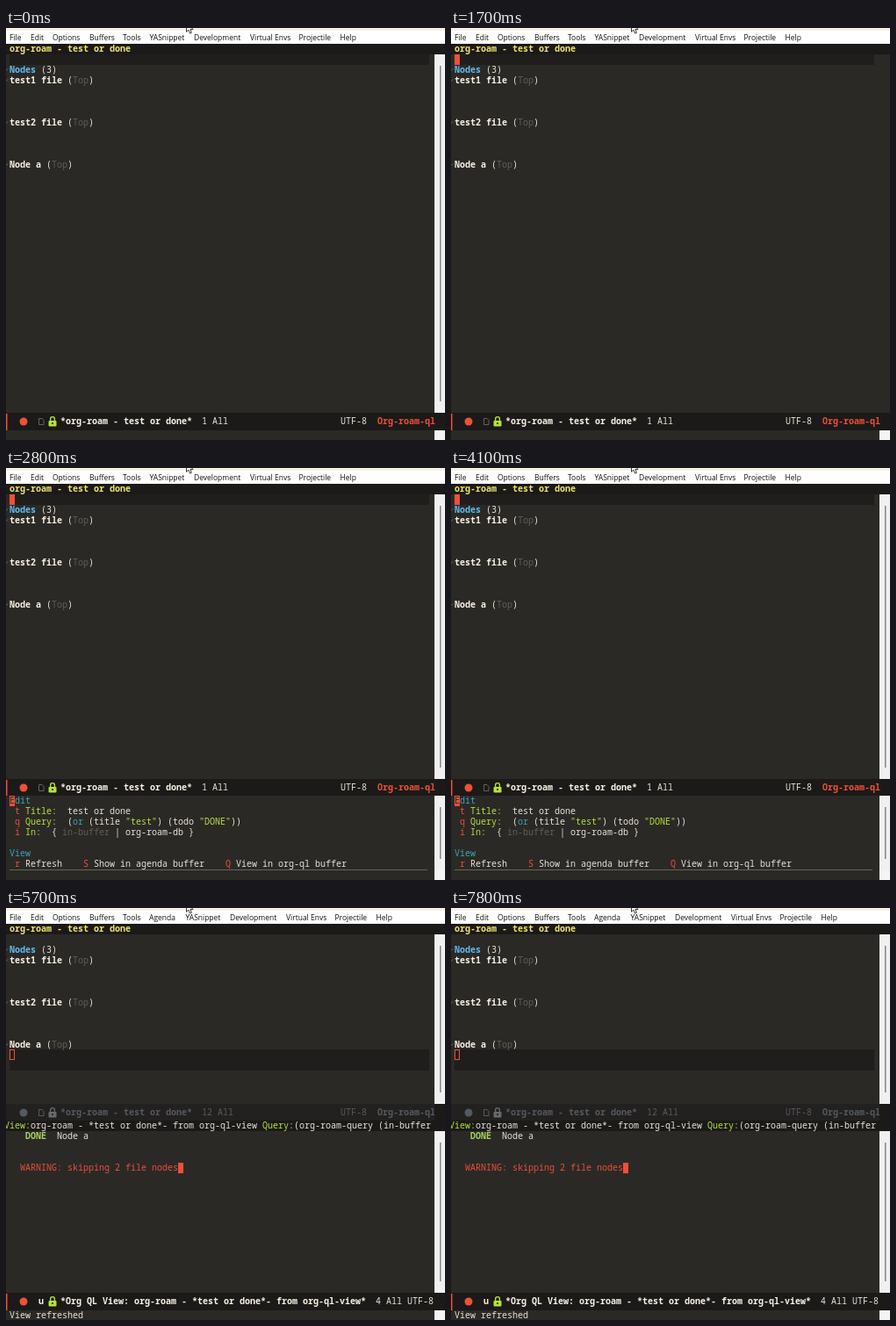
Recreate the animation shown at these times as an HTML page. Size 500 by 469 pixels, loop 8000 ms.

```html
<!DOCTYPE html>
<html lang="en">
<head>
<meta charset="utf-8">
<title>Editor session</title>
<style>
  html, body { margin: 0; width: 100%; height: 100%; overflow: hidden; background: #2b2926; }
  svg { display: block; width: 500px; height: 469px; }
  text { font: 10px "Noto Sans Mono", monospace; white-space: pre; fill: #e9e2d6; font-variant-ligatures: none; }
  .menu text { font: 8.5px "Open Sans", sans-serif; fill: #111; }
  .b { font-weight: 700; fill: #f8f0e2; }
  .title { font-weight: 700; fill: #f0e468; }
  .blue { font-weight: 700; fill: #5cbcf0; }
  .dim { fill: #615d56; }
  .red { fill: #e94f3a; }
  .mode { font-weight: 700; fill: #ee4f39; }
  .green { fill: #b4e03c; }
  .done { font-weight: 700; fill: #a9d060; }
  .cyan { fill: #38a5b5; }
  .off { fill: #555960; }
  .offb { font-weight: 700; fill: #555960; }
  .dark { fill: #2b2926; }
</style>
</head>
<body>
<svg id="stage" viewBox="0 0 500 469"></svg>
<script>
const LOOP = 8000;
const RED = '#f04f38', BAR = '#1b1a19', BG = '#2b2926', CURRENT = '#1f1e1c';

const rect = (x, y, w, h, fill) =>
  `<rect x="${x}" y="${y}" width="${w}" height="${h}" fill="${fill}"/>`;
const escapeText = s => s.replace(/&/g, '&amp;').replace(/</g, '&lt;');
const layer = (id, body) => `<g id="${id}">${body}</g>`;

// A row of text; runs alternate between a string and its class.
function row(x, top, ...runs) {
  let spans = '';
  for (let i = 0; i < runs.length; i += 2)
    spans += `<tspan class="${runs[i + 1] || ''}">${escapeText(runs[i])}</tspan>`;
  return `<text x="${x}" y="${top + 9}">${spans}</text>`;
}

function menu(id, withAgenda) {
  const items = [['File', 4], ['Edit', 28], ['Options', 53], ['Buffers', 95], ['Tools', 133]];
  if (withAgenda) items.push(['Agenda', 163]);
  const shift = withAgenda ? 41 : 0;
  for (const [name, x] of [['YASnippet', 163.5], ['Development', 214], ['Virtual Envs', 278],
                           ['Projectile', 333.5], ['Help', 380.5]])
    items.push([name, x + shift]);
  return `<g id="${id}" class="menu">` +
    items.map(([name, x]) => `<text x="${x}" y="13.5">${name}</text>`).join('') + '</g>';
}

const scrollbar = (top, bottom) =>
  rect(488, top, 12, bottom - top, '#f0f0f0') +
  rect(494, top + 13, 1.5, bottom - top - 26, '#858585');

const lock = (y, color) =>
  `<path d="M50.6 ${y - 1}v-2a2.4 2.4 0 0 1 4.8 0v2" fill="none" stroke="${color}" stroke-width="1.4"/>` +
  `<rect x="48.5" y="${y - 1}" width="9" height="6.5" rx="1" fill="${color}"/>` +
  `<circle cx="53" cy="${y + 2}" r="1" fill="${BAR}"/>`;

const fileIcon = (y, color) =>
  `<path d="M37.5 ${y - 3.5}h3.5l2 2v5h-5.5z" fill="none" stroke="${color}" stroke-width=".8"/>`;

function modeline(top, height, active, ...content) {
  const y = top + 10;
  const color = active ? RED : '#555960';
  return rect(0, top, 500, height, active ? BAR : '#22211f') +
    (active ? rect(0, top + 1, 1.5, height - 1, RED) : '') +
    `<circle cx="20" cy="${y}" r="4.5" fill="${color}"/>` +
    lock(y, active ? '#b4e03c' : '#666a70') + content.join('');
}

function roamModeline(top, height, active, position) {
  const bold = active ? 'b' : 'offb', plain = active ? '' : 'off';
  return modeline(top, height, active,
    fileIcon(top + 10, active ? '#77736c' : '#666a70'),
    row(62, top + 4, '*org-roam - test or done*', bold),
    row(223, top + 4, position, plain),
    row(381, top + 4, 'UTF-8', plain),
    row(423, top + 4, 'Org-roam-ql', active ? 'mode' : 'offb'));
}

const fringe = [47, 59, 107, 155].map(y =>
  `<path d="M0 ${y + 1.5}l2.5 -2" stroke="#6b665e" stroke-width=".9"/>`).join('');

const frame =
  rect(0, 0, 500, 469, BG) +
  rect(0, 0, 500, 3, '#f7efe4') + rect(0, 3, 500, 15, '#fff') +
  rect(0, 18, 500, 12, BAR) + row(4, 18, 'org-roam - test or done', 'title');

const nodes = fringe +
  row(4, 42, 'Nodes', 'blue', ' (3)', '') +
  [['test1 file', 54], ['test2 file', 102], ['Node a', 150]].map(([name, top]) =>
    row(4, top, name, 'b', ' (', '', 'Top', 'dim', ')', '')).join('');

const popup =
  roamModeline(354, 19, true, '1 All') +
  rect(0, 373, 500, 96, BG) +
  rect(4, 373, 6, 12, RED) +
  row(4, 373, 'E', 'dark', 'dit', 'cyan') +
  row(10, 385, 't ', 'red', 'Title:', 'green', '  test or done', '') +
  row(10, 397, 'q ', 'red', 'Query:', 'green', '  (', '', 'or', 'cyan', ' (title ', '',
    '"test"', 'green', ') (todo ', '', '"DONE"', 'green', '))', '') +
  row(10, 409, 'i ', 'red', 'In:', 'green', '  { ', '', 'in-buffer', 'dim', ' | org-roam-db }', '') +
  row(4, 433, 'View', 'cyan') +
  row(10, 445, 'r ', 'red', 'Refresh    ', '', 'S ', 'red', 'Show in agenda buffer    ', '',
    'Q ', 'red', 'View in org-ql buffer', '') +
  rect(4, 457, 476, 1, '#66635d');

const splitBars = scrollbar(30, 223) + rect(488, 223, 12, 31, BAR) +
  scrollbar(254, 438) + rect(488, 438, 12, 20, BAR);

const results =
  roamModeline(223, 19, false, '12 All') +
  rect(0, 242, 500, 12, BAR) +
  row(-2, 242, 'View:', 'green', 'org-roam - *test or done*- from org-ql-view ', '',
    'Query:', 'green', '(org-roam-query (in-buffer ', '', '"*', 'green') +
  rect(0, 254, 488, 184, BG) +
  row(22, 254, 'DONE', 'done', '  Node a', '') +
  row(16, 290, 'WARNING: skipping 2 file nodes', 'red') +
  modeline(438, 20, true,
    row(37, 442, 'u', 'b'),
    row(62, 442, '*Org QL View: org-roam - *test or done*- from org-ql-view*', 'b'),
    row(421, 442, '4 All UTF-8', ''),
    `<circle cx="503" cy="448" r="4.5" fill="${RED}"/>`);

const pointer = '<path d="M205.5 -7V4.3L207.8 2.2L209.6 6.2L211.4 5.3L209.8 1.6H213Z" ' +
  'fill="#fff" stroke="#222" stroke-width=".9"/>';

document.getElementById('stage').innerHTML =
  frame + menu('shortMenu', false) + menu('longMenu', true) +
  layer('topLine', rect(4, 30, 478, 12, CURRENT)) +
  layer('endLine', rect(4, 161, 478, 24, CURRENT) +
    `<rect x="4.5" y="161.5" width="5" height="11" fill="none" stroke="${RED}"/>`) +
  nodes +
  layer('topCursor', rect(4, 30, 6, 12, RED)) +
  layer('fullModeline', roamModeline(438, 20, true, '1 All')) +
  layer('popup', popup) +
  layer('results', results) +
  layer('fullBar', scrollbar(30, 438)) +
  layer('popupBars', scrollbar(30, 354) + scrollbar(373, 458)) +
  layer('splitBars', splitBars) +
  layer('warningCursor', rect(196, 290, 6, 12, RED)) +
  layer('message', row(4, 458, 'View refreshed', '')) +
  rect(488, 458, 12, 11, '#f4f4f4') + pointer;

// Visible spans of each layer, in ms.
const spans = {
  shortMenu: [[0, 5600]],
  longMenu: [[5600, LOOP]],
  topLine: [[0, 5700]],
  endLine: [[5700, LOOP]],
  topCursor: [[500, 1000], [1500, 2300], [2800, 3300], [3800, 4300]],
  fullModeline: [[0, 1800]],
  popup: [[1800, 5700]],
  results: [[5700, LOOP]],
  fullBar: [[0, 1700]],
  popupBars: [[1800, 5600]],
  splitBars: [[5600, LOOP]],
  warningCursor: [[5700, 6200], [6700, 7200], [7700, LOOP]],
  message: [[5600, LOOP]]
};
const layers = Object.entries(spans).map(([id, times]) => [document.getElementById(id), times]);

const start = performance.now();
function draw(now) {
  const t = Math.max(0, now - start) % LOOP;
  for (const [node, times] of layers)
    node.style.display = times.some(([from, to]) => t >= from && t < to) ? '' : 'none';
  requestAnimationFrame(draw);
}
draw(start);
</script>
</body>
</html>
```
